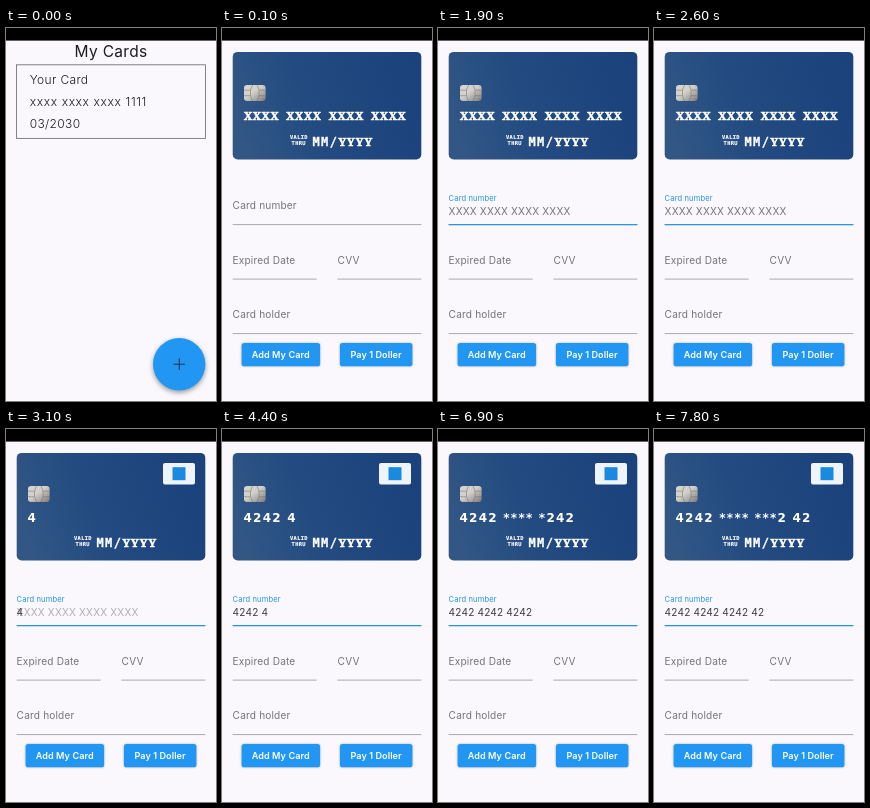
Write an HTML page that moves like this. It is 210 by 373 pixels and loops after 8000 ms.

```html
<!DOCTYPE html>
<html lang="en">
<head>
<meta charset="utf-8">
<title>Add a card</title>
<style>
  html, body { margin: 0; width: 100%; height: 100%; overflow: hidden; background: #faf8fc; }
  svg { display: block; width: 100vw; height: 100vh; }
  text { font-family: Inter, sans-serif; white-space: pre; }
  .list { font-size: 12px; letter-spacing: .35px; font-weight: 300; fill: #1c1c1e; }
  .field { font-size: 10.1px; letter-spacing: .17px; fill: #757478; }
  .rule { stroke: #949296; stroke-width: .8; }
  .button { font-size: 9.1px; font-weight: 600; letter-spacing: .06px; fill: #fff; text-anchor: middle; }
  .mono { font: bold 12px "DejaVu Sans Mono", monospace; fill: #fff; }
  .date { letter-spacing: 1.4px; stroke: #fff; stroke-width: .3; }
  .slab { font: bold 11px "Noto Serif", serif; letter-spacing: .8px; word-spacing: 3.3px; fill: #fff; stroke: #fff; stroke-width: .6; }
  .digits { font: bold 12px "DejaVu Sans", sans-serif; letter-spacing: 1.25px; fill: #fff; }
  .tiny { font-size: 5.3px; letter-spacing: .4px; stroke: #fff; stroke-width: .15; }
  .raised { filter: drop-shadow(0 .9px .9px rgba(0, 0, 0, .28)); }
  .floating { filter: drop-shadow(0 2px 2.5px rgba(0, 0, 0, .4)); }
</style>
</head>
<body>
<svg viewBox="0 0 210 373" preserveAspectRatio="none">
  <defs>
    <linearGradient id="navy" x1="0" y1=".6" x2="1" y2=".4">
      <stop offset="0" stop-color="#325785"/>
      <stop offset=".4" stop-color="#234b81"/>
      <stop offset="1" stop-color="#1b427b"/>
    </linearGradient>
    <linearGradient id="silver" x1="0" y1="0" x2="1" y2="1">
      <stop offset="0" stop-color="#d9d7d3"/>
      <stop offset=".45" stop-color="#d2cfca"/>
      <stop offset="1" stop-color="#7c7a78"/>
    </linearGradient>
  </defs>
  <rect width="210" height="373" fill="#faf8fc"/>
  <rect width="210" height="12.6" fill="#000"/>

  <g id="cards">
    <text x="105" y="28.7" text-anchor="middle" font-size="15.5" letter-spacing=".3" fill="#1c1c1e">My Cards</text>
    <rect x="10.5" y="36.8" width="189" height="73.6" fill="none" stroke="#77767a" stroke-width=".9"/>
    <text class="list" x="23.7" y="56">Your Card</text>
    <text class="list" x="23.7" y="78" style="letter-spacing:.62px">xxxx xxxx xxxx 1111</text>
    <text class="list" x="23.7" y="100">03/2030</text>
    <circle class="floating" cx="173.2" cy="336.2" r="26.2" fill="#2196f3"/>
    <path d="M167.6 336.3h11.4M173.3 330.6v11.4" stroke="#17385a" stroke-width="1.1"/>
  </g>

  <g id="form">
    <rect x="10.7" y="23.9" width="188.6" height="107.6" rx="5" fill="url(#navy)"/>
    <rect x="22" y="57" width="21.6" height="16" rx="3.2" fill="url(#silver)"/>
    <path d="M22 62.2h6.5l2-5.2M22 67.7h6.5l2 5.3M43.6 62.2h-6.5l-2-5.2M43.6 67.7h-6.5l-2 5.3M28.5 62.2v5.5M37.1 62.2v5.5"
      fill="none" stroke="#6f6c69" stroke-width=".5"/>
    <g id="badge">
      <rect x="157" y="34" width="32" height="21.5" rx="2" fill="#eff4fa"/>
      <rect x="166.5" y="38.2" width="13" height="13" fill="#1a8ae0"/>
    </g>
    <text id="blank" class="slab" x="21.9" y="92.4">XXXX XXXX XXXX XXXX</text>
    <text id="pan" class="digits" x="21.5" y="92.5"></text>
    <text class="mono tiny" x="68" y="111">VALID</text>
    <text class="mono tiny" x="69.6" y="117">THRU</text>
    <text class="mono date" x="90.5" y="117.9">MM/<tspan class="slab" style="letter-spacing:1.1px">YYYY</tspan></text>

    <text id="label" class="field">Card number</text>
    <text id="hint" class="field" x="10.6" y="186.6">XXXX XXXX XXXX XXXX</text>
    <text id="entry" class="field" x="10.6" y="186.8" style="fill:#3c3c3f"></text>
    <text class="field" x="10.6" y="235.6">Expired Date</text>
    <text class="field" x="115.6" y="235.6">CVV</text>
    <text class="field" x="10.6" y="290">Card holder</text>
    <path class="rule" d="M10.7 196.6H199.3M10.7 251.1H94.7M115.5 251.1H199.3M10.7 305.6H199.3"/>
    <path id="focus" d="M10.7 196.6H199.3" stroke="#2794e4" stroke-width="1.3"/>

    <g class="raised">
      <rect x="19.6" y="315.1" width="78.5" height="23.2" rx="2.6" fill="#2196f3"/>
      <rect x="117.9" y="315.1" width="72.5" height="23.2" rx="2.6" fill="#2196f3"/>
    </g>
    <text class="button" x="58.7" y="330">Add My Card</text>
    <text class="button" x="154.1" y="330">Pay 1 Doller</text>
  </g>
</svg>
<script>
const LOOP = 8000, OPEN = 100, FOCUS = 1150;
const KEYS = [3000, 3400, 3800, 4000, 4400, 4700, 4900, 5300, 5600, 6100, 6600, 6900, 7200, 7600];
const $ = id => document.getElementById(id);
const show = (id, on) => $(id).style.display = on ? '' : 'none';
const mix = (a, b, k) => a + (b - a) * k;
const ramp = (t, start, length) => {
  const k = Math.min(1, Math.max(0, (t - start) / length));
  return k * k * (3 - 2 * k);
};
const group = s => s.replace(/(.{4})(?=.)/g, '$1 ');

// The first four and the last three digits stay readable.
const masked = s => [...s].map((c, i) => i > 3 && i < s.length - 3 ? '*' : c).join('');

let typed = -1;
function type(count) {
  if (count === typed) return;
  typed = count;
  const number = '42'.repeat(7).slice(0, count);
  $('entry').textContent = group(number);
  $('pan').textContent = group(masked(number));
  show('blank', !count);
  show('badge', count);
}

function draw(now) {
  const t = now % LOOP;
  show('cards', t < OPEN);
  show('form', t >= OPEN);
  type(KEYS.filter(k => k <= t).length);

  const k = ramp(t, FOCUS, 250);
  const rgb = [[117, 39], [116, 148], [120, 228]].map(([a, b]) => Math.round(mix(a, b, k)));
  $('label').setAttribute('transform', `translate(10.6 ${mix(180.9, 172.6, k)}) scale(${mix(1, .75, k)})`);
  $('label').style.fill = `rgb(${rgb})`;
  $('focus').style.opacity = k;
  $('hint').style.opacity = k * (1 - ramp(t, KEYS[0], 220));
}

const start = performance.now();
function tick() {
  draw(performance.now() - start);
  requestAnimationFrame(tick);
}
tick();
</script>
</body>
</html>
```
